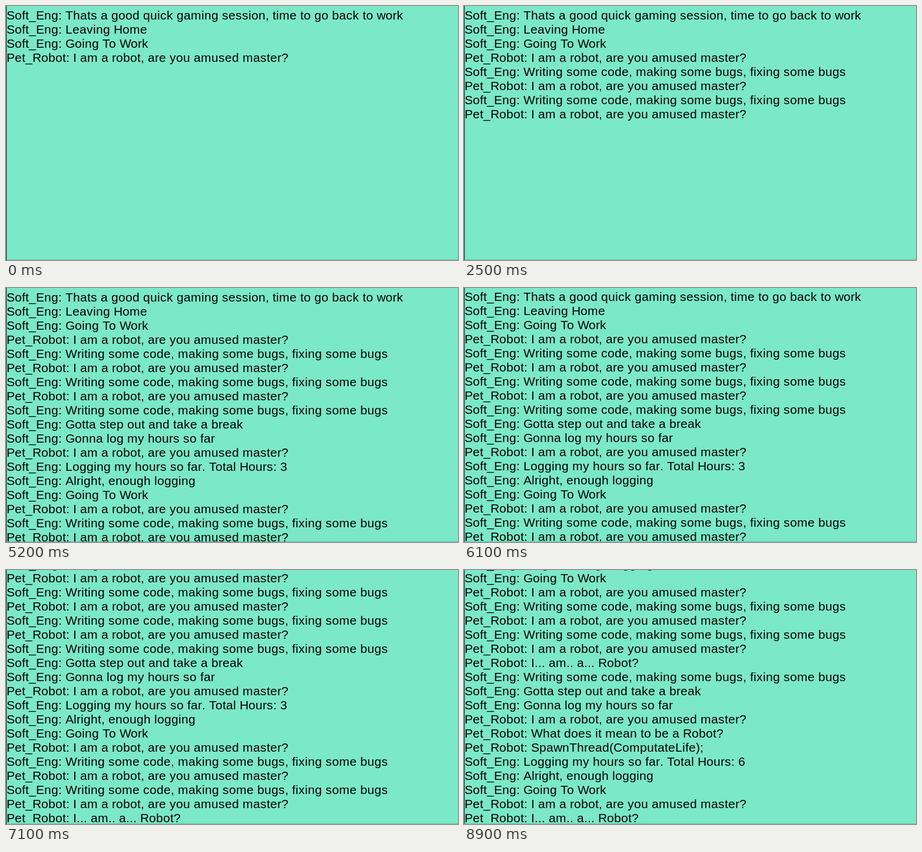
Animation, 768 px wide and 432 px high, one loop 9.5 s. Source, as an HTML page with a canvas:

```html
<!DOCTYPE html>
<html lang="en">
<head>
<meta charset="utf-8">
<title>Robot log</title>
<style>
  html, body { margin: 0; width: 100%; height: 100%; overflow: hidden; background: #7be8c8; }
  canvas { display: block; }
</style>
</head>
<body>
<canvas id="stage" width="768" height="432"></canvas>
<script>
const ctx = document.getElementById('stage').getContext('2d');
const W = 768, H = 432, LOOP = 9500;
const LEFT = 1, BASE = 23, LINE = 24;

const eng = s => 'Soft_Eng: ' + s;
const pet = s => 'Pet_Robot: ' + s;
const amused = pet('I am a robot, are you amused master?');
const doubt = pet('I... am.. a... Robot?');
const coding = eng('Writing some code, making some bugs, fixing some bugs');
const toWork = eng('Going To Work');
const rest = [eng('Gotta step out and take a break'), eng('Gonna log my hours so far'), amused];
const logHours = n => [eng('Logging my hours so far. Total Hours: ' + n), eng('Alright, enough logging'), toWork, amused];

const log = [
  eng('Thats a good quick gaming session, time to go back to work'),
  eng('Leaving Home'), toWork, amused,
  coding, amused,
  coding, amused,
  coding, ...rest,
  ...logHours(3),
  coding, amused,
  coding, amused, doubt,
  coding, ...rest, pet('What does it mean to be a Robot?'), pet('SpawnThread(ComputateLife);'),
  ...logHours(6), doubt
];

// [start in ms, lines logged, scroll in px]
const steps = [
  [0, 4, 0], [1500, 6, 0], [2500, 8, 0], [3400, 12, 0], [4300, 16, 0], [5200, 18, 0],
  [6100, 18, 1], [6200, 18, 2], [7100, 21, 74], [8000, 27, 218], [8900, 32, 338]
];

// Glyphs sit on whole pixels, as in a hinted text box.
const kern = { To: -2, Wo: -1 };
const widths = {};
function advance(ch) {
  return widths[ch] ??= Math.round(ctx.measureText(ch).width + 0.02);
}

function drawLine(text, y) {
  let x = LEFT;
  for (let i = 0; i < text.length; i++) {
    ctx.fillText(text[i], x, y);
    x += advance(text[i]) + (kern[text.slice(i, i + 2)] || 0);
  }
}

function rect(color, x, y, w, h) {
  ctx.fillStyle = color;
  ctx.fillRect(x, y, w, h);
}

function draw(t) {
  const [, count, scroll] = steps.findLast(s => t >= s[0]);
  rect('#7be8c8', 0, 0, W, H);
  ctx.font = '21px "Liberation Sans", Arial, sans-serif';
  ctx.fillStyle = '#000';
  log.slice(0, count).forEach((text, i) => {
    const y = BASE + i * LINE - scroll;
    if (y > -8 && y < H + LINE) drawLine(text, y);
  });
  rect('#21403a', 0, 0, 1, H);
  rect('#62bda3', 1, 0, 1, H);
  rect('#62bda3', 1, H - 1, W - 1, 1);
}

let start;
function tick(now) {
  start ??= now;
  draw((now - start) % LOOP);
  requestAnimationFrame(tick);
}
draw(0);
requestAnimationFrame(tick);
</script>
</body>
</html>
```
